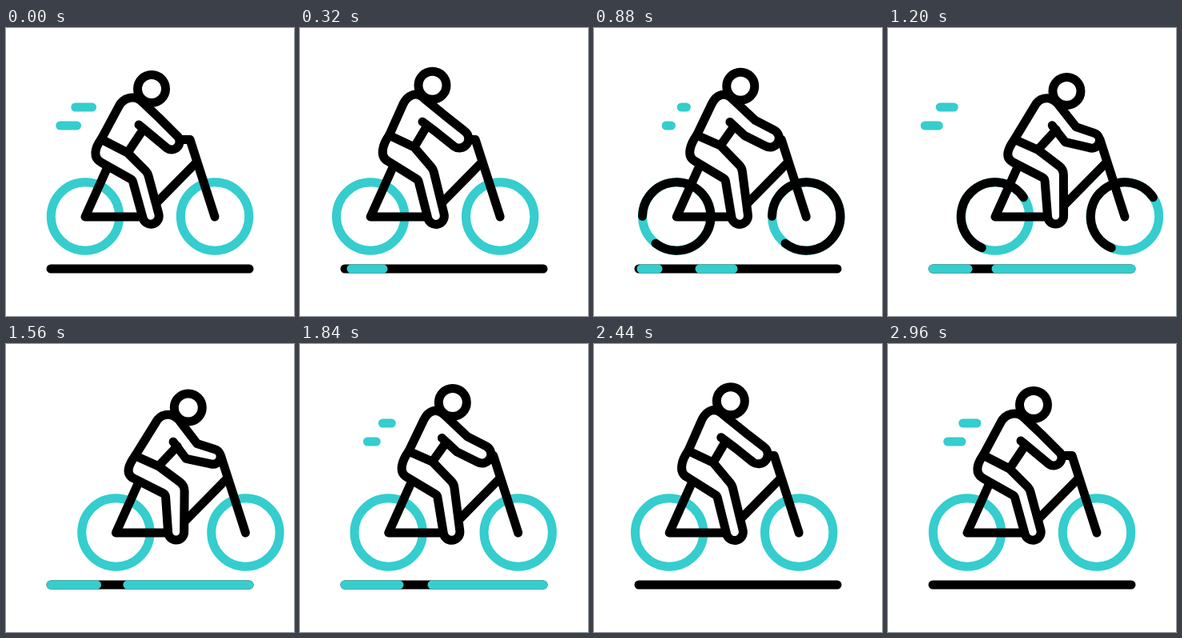
These frames come from a looping animation (360x360 px, 3 s). An HTML page with a canvas:

```html
<!DOCTYPE html>
<html lang="en">
<head>
<meta charset="utf-8">
<title>Cyclist</title>
<style>
html, body { margin: 0; width: 100%; height: 100%; overflow: hidden; background: #fff; }
canvas { display: block; width: 360px; height: 360px; }
</style>
</head>
<body>
<canvas id="stage"></canvas>
<script>
const LOOP = 3000, STEP = 40, TAU = Math.PI * 2;
const TEAL = '#35cdce', BLACK = '#000', WHITE = '#fff';
const canvas = document.getElementById('stage');
const ctx = canvas.getContext('2d');
const ratio = window.devicePixelRatio || 1;
canvas.width = canvas.height = 360 * ratio;

// Rider joints, x measured from the rear hub.
const SEATED = {
  head: [83, 76], waist: [20, 139], back: [42, 98], shoulder: [72, 93], elbow: [93, 113],
  wristTop: [114, 134], wristLow: [102, 150], elbowLow: [84, 135], armpit: [67, 121],
  chest: [73, 126], belly: [53, 156], knee: [78, 181], footR: [92, 233], footL: [72, 237],
  calf: [59, 190], hip: [20, 168]
};
const UPRIGHT = {
  head: [72.5, 68], waist: [26, 130], back: [40, 92], shoulder: [64, 85], elbow: [96, 109],
  wristTop: [121, 125], wristLow: [106, 146], elbowLow: [83, 128], armpit: [63, 114],
  chest: [68, 120], belly: [56, 143], knee: [78.5, 173], footR: [92, 233], footL: [71, 237],
  calf: [60, 190], hip: [23, 165]
};
const LEANING = {
  head: [91, 80], waist: [24, 140], back: [50, 98.5], shoulder: [79, 95], elbow: [101.5, 125],
  wristTop: [124, 132], wristLow: [119, 150], elbowLow: [88, 144], armpit: [72, 122.5],
  chest: [77, 128], belly: [53, 153], knee: [86, 177], footR: [85, 235], footL: [65, 235],
  calf: [62, 188], hip: [22, 168]
};

const LEGS = [
  { from: 115, to: 560, a: SEATED, b: UPRIGHT, x: [99, 79] },
  { from: 560, to: 1400, a: UPRIGHT, b: LEANING, x: [79, 139] },
  { from: 1485, to: 2210, a: LEANING, b: UPRIGHT, x: [139, 91] },
  { from: 2210, to: 2820, a: UPRIGHT, b: SEATED, x: [91, 99] }
];

// Teal stretches of road: start and end as time, x pairs.
const ROAD = [
  { start: [[180, 56], [320, 64], [880, 132], [1200, 135], [1840, 165], [2220, 304]],
    end: [[80, 56], [320, 104], [880, 174], [1190, 304]] },
  { start: [[700, 56], [880, 59], [1200, 56], [1840, 56], [2220, 304]],
    end: [[700, 56], [880, 80], [1200, 100], [1840, 124], [2180, 304]] }
];
const GUSTS = [778, 1697, 2760];

const mix = (a, b, k) => a + (b - a) * k;
const part = (t, from, to) => Math.min(1, Math.max(0, (t - from) / (to - from)));

// Cubic Bezier easing (.33, 0, .5, 1)
function ease(p) {
  let lo = 0, hi = 1;
  for (let i = 0; i < 20; i++) {
    const s = (lo + hi) / 2, r = 1 - s;
    if (0.99 * s * r * r + 1.5 * s * s * r + s * s * s < p) lo = s; else hi = s;
  }
  return lo * lo * (3 - 2 * lo);
}

function track(keys, t) {
  let v = keys[0][1];
  for (let i = 1; i < keys.length; i++) {
    const [t0, v0] = keys[i - 1], [t1, v1] = keys[i];
    if (t >= t0) v = mix(v0, v1, part(t, t0, t1));
  }
  return v;
}

function poseAt(t) {
  const leg = LEGS.filter(l => t >= l.from).pop() || LEGS[0];
  const k = ease(part(t, leg.from, leg.to));
  const joints = {};
  for (const name in leg.a) {
    joints[name] = leg.a[name].map((v, i) => mix(v, leg.b[name][i], k));
  }
  return { x: mix(leg.x[0], leg.x[1], k), joints };
}

function stroke(color) {
  ctx.strokeStyle = color;
  ctx.stroke();
}

function line(color, ...points) {
  ctx.beginPath();
  points.forEach(p => ctx.lineTo(p[0], p[1]));
  stroke(color);
}

// Half circle running clockwise from a to b
function cap(a, b) {
  const angle = Math.atan2(a[1] - b[1], a[0] - b[0]);
  const r = Math.hypot(a[0] - b[0], a[1] - b[1]) / 2;
  ctx.arc((a[0] + b[0]) / 2, (a[1] + b[1]) / 2, r, angle, angle + Math.PI);
}

function wheel(cx, turn, head, tail) {
  ctx.beginPath();
  ctx.arc(cx, 235.5, 42.7, 0, TAU);
  stroke(TEAL);
  if (head - tail < 0.003) return;
  ctx.beginPath();
  ctx.arc(cx, 235.5, 42.7, turn - tail * TAU, turn - head * TAU, true);
  stroke(BLACK);
}

function bike(t, x) {
  const head = ease(part(t, 480, 1060));
  const tail = ease(part(t, 970, 1570));
  const turn = (127 - 0.48 * (x - 105)) * Math.PI / 180;
  ctx.save();
  ctx.translate(x, 0);
  wheel(0, turn, head, tail);
  wheel(162, turn, head, tail);
  line(BLACK, [27, 176], [0, 236], [72, 236], [139, 168]);
  line(BLACK, [162, 236], [131, 139.5], [119, 139.5]);
  ctx.restore();
}

function torso(j) {
  const [bx, by] = j.back, [sx, sy] = j.shoulder;
  ctx.moveTo(...j.waist);
  ctx.lineTo(bx, by);
  ctx.bezierCurveTo(bx + 5, by - 10, sx - 11, sy - 11, sx, sy);
  ctx.lineTo(...j.elbow);
  cap(j.wristTop, j.wristLow);
  ctx.lineTo(...j.elbowLow);
  ctx.lineTo(...j.armpit);
}

function rider(x, j) {
  ctx.save();
  ctx.translate(x, 0);
  ctx.fillStyle = WHITE;

  ctx.beginPath();
  torso(j);
  ctx.lineTo(...j.chest);
  ctx.lineTo(...j.belly);
  ctx.fill();
  ctx.beginPath();
  torso(j);
  stroke(BLACK);
  line(BLACK, j.chest, j.belly);

  const [wx, wy] = j.waist, [hx, hy] = j.hip;
  ctx.beginPath();
  ctx.moveTo(wx, wy);
  ctx.lineTo(...j.belly);
  ctx.arcTo(...j.knee, ...j.footR, 14);
  cap(j.footR, j.footL);
  ctx.arcTo(...j.calf, hx, hy, 6);
  ctx.lineTo(hx, hy);
  ctx.bezierCurveTo(hx - 11, hy - 6, wx - 8, wy + 11, wx, wy);
  ctx.closePath();
  ctx.fill();
  stroke(BLACK);

  ctx.beginPath();
  ctx.arc(...j.head, 17.5, 0, TAU);
  ctx.fill();
  stroke(BLACK);
  ctx.restore();
}

function road(t) {
  line(BLACK, [56, 301], [304, 301]);
  for (const r of ROAD) {
    const a = track(r.start, t), b = track(r.end, t);
    if (b - a > 0.5) line(TEAL, [a, 301], [b, 301]);
  }
}

function gusts(t) {
  for (const from of GUSTS) {
    const age = (t - from + LOOP) % LOOP;
    if (age <= 0 || age >= 520) continue;
    const head = mix(96.5, 43.5, ease(age / 520));
    const tail = mix(96.5, 43.5, Math.pow(part(age, 90, 520), 1.8));
    line(TEAL, [head, 122], [tail, 122]);
    line(TEAL, [head + 19, 99], [tail + 19, 99]);
  }
}

function draw(t) {
  ctx.setTransform(ratio, 0, 0, ratio, 0, 0);
  ctx.fillStyle = WHITE;
  ctx.fillRect(0, 0, 360, 360);
  ctx.lineWidth = 11;
  ctx.lineCap = ctx.lineJoin = 'round';
  const { x, joints } = poseAt(t);
  road(t);
  gusts(t);
  bike(t, x);
  rider(x, joints);
}

const begin = performance.now();
function tick() {
  const t = (performance.now() - begin) % LOOP;
  draw(Math.floor(t / STEP) * STEP);
  requestAnimationFrame(tick);
}
tick();
</script>
</body>
</html>
```
